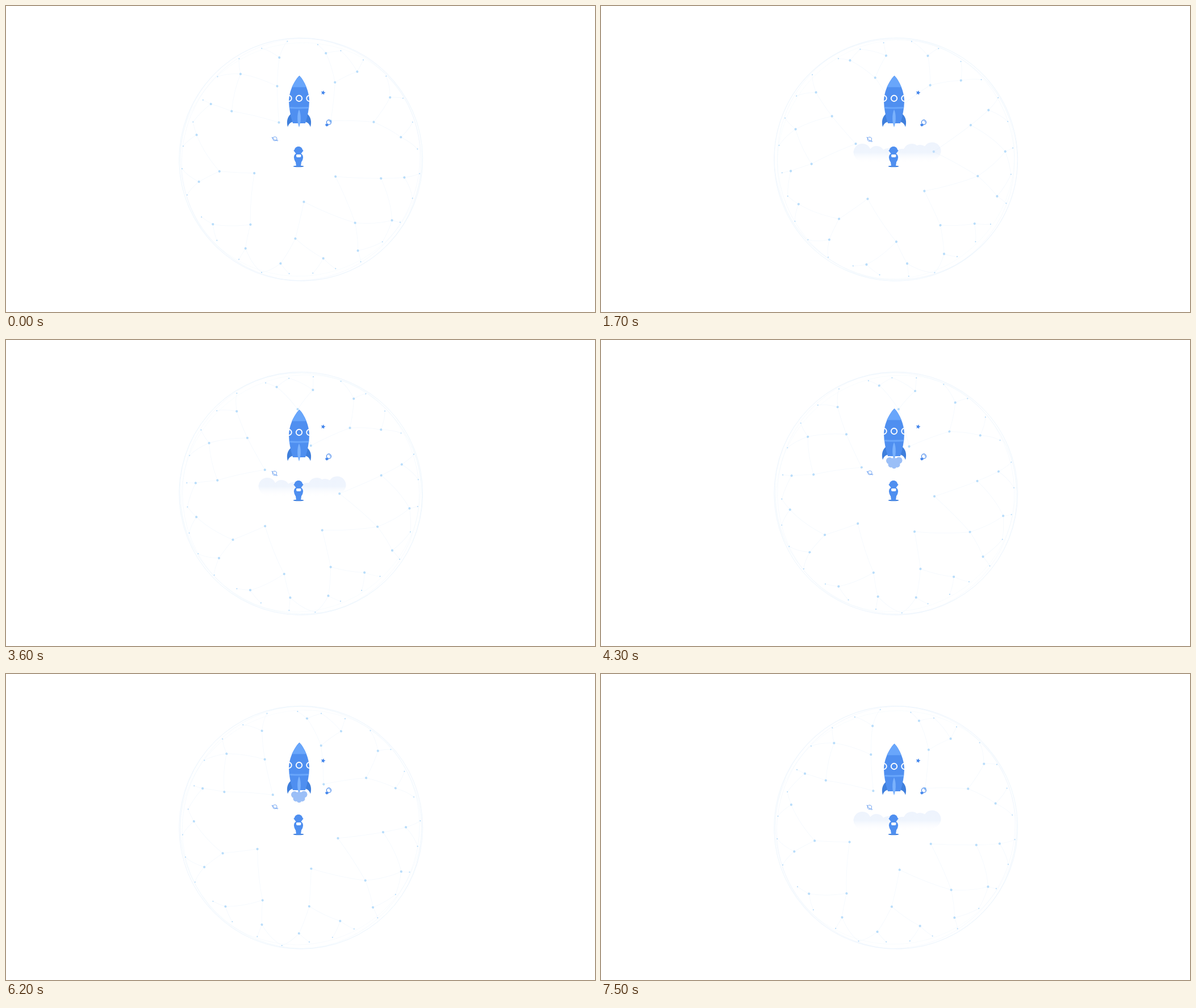
Write an HTML page that moves like this. It is 1037 px wide and 540 px high and loops after 8000 ms.

```html
<!DOCTYPE html>
<html lang="en">
<head>
<meta charset="utf-8">
<title>Rocket launch</title>
<style>
  html, body { margin: 0; width: 100%; height: 100%; overflow: hidden; background: #fff; }
  svg { display: block; width: 1037px; height: 540px; }
  .lines { fill: none; stroke: #f6fafe; stroke-width: 1; }
  .rim { fill: none; stroke: #eef6fd; stroke-width: .9; }
  .dots { fill: #b9ddfa; }
  .body { fill: #4f8ff0; }
  .light { fill: #69a6fb; }
  .dark { fill: #3f7fdc; }
  .ring { fill: none; stroke: #fff; stroke-width: 1.9; }
  .icon { fill: none; stroke: #4587ec; }
</style>
</head>
<body>
<svg viewBox="0 0 1037 540">
  <defs>
    <linearGradient id="beam" gradientUnits="userSpaceOnUse" x1="0" y1="206" x2="0" y2="260">
      <stop offset="0" stop-color="#a8c6f8"/>
      <stop offset=".5" stop-color="#c4d9fa"/>
      <stop offset="1" stop-color="#e6effd" stop-opacity="0"/>
    </linearGradient>
    <linearGradient id="mist" gradientUnits="userSpaceOnUse" x1="0" y1="240" x2="0" y2="277">
      <stop offset="0" stop-color="#c6d9f8"/>
      <stop offset=".5" stop-color="#cbddf9"/>
      <stop offset="1" stop-color="#fff" stop-opacity="0"/>
    </linearGradient>
    <clipPath id="hull">
      <path d="M516.5 123C522 128 533.5 146 534 168Q533.5 187 527 207H505Q498.500 187 498 168C498.500 146 511 128 516.500 123Z"/>
    </clipPath>
    <clipPath id="puffs">
      <circle cx="460" cy="258.500" r="15.500"/>
      <circle cx="485" cy="261" r="14"/>
      <circle cx="505" cy="264" r="13"/>
      <circle cx="530" cy="265" r="13"/>
      <circle cx="547" cy="258" r="15"/>
      <circle cx="562" cy="259" r="14"/>
      <circle cx="583" cy="256" r="15.500"/>
      <rect x="456" y="260" width="130" height="17"/>
    </clipPath>
  </defs>

  <g id="globe">
    <g id="rim" class="rim"></g>
    <path id="net" class="lines"/>
    <g id="dots" class="dots"></g>
  </g>

  <g id="flame" fill="url(#beam)">
    <path d="M513 206H519L530 260H502Z" opacity=".2"/>
    <path d="M510 206H513.500L506 260H488Z"/>
    <path d="M518.500 206H522L544 260H526Z"/>
  </g>

  <g id="rocket">
    <path class="dark" d="M502 190C495 196 493.500 204 496 213.500C498 208 501 205 506 204Z"/>
    <path class="dark" d="M530 190C537 196 538.500 204 536 213.500C534 208 531 205 526 204Z"/>
    <g clip-path="url(#hull)">
      <path class="body" d="M490 120H542V210H490Z"/>
      <path class="light" d="M490 120H542V143.300H490Z"/>
      <path class="light" d="M490 177.500Q516 179.500 542 177.500V180.500Q516 182.500 490 180.500Z"/>
      <g class="ring">
        <circle cx="497.600" cy="163" r="5.200"/>
        <circle cx="516" cy="163" r="5.200"/>
        <circle cx="534.400" cy="163" r="5.200"/>
      </g>
    </g>
    <path fill="#7bb2fc" d="M516 182.500Q519 189 518.800 199Q518.500 208 516 214Q513.500 208 513.200 199Q513 189 516 182.500Z"/>
    <g id="puff" fill="#9bbff7">
      <circle cx="508" cy="215" r="6"/>
      <circle cx="524.500" cy="214.500" r="6"/>
      <circle cx="516" cy="218" r="8"/>
      <circle cx="510.500" cy="222" r="5"/>
      <circle cx="521.500" cy="222" r="5"/>
      <circle cx="516" cy="225" r="4"/>
    </g>
  </g>

  <rect id="cloud" x="444" y="238" width="156" height="40" fill="url(#mist)" clip-path="url(#puffs)"/>

  <g>
    <ellipse class="dark" cx="515" cy="283" rx="9.500" ry="1.300"/>
    <path class="body" d="M515 248C519 248 521.500 250.500 522 253.500L523.600 255.300L519.500 260.500Q523.500 263 523 268Q522.500 273 520 275.500L519 283H511L510 275.500Q507.500 273 507 268Q506.500 263 510.500 260.500L506.400 255.300L508 253.500C508.500 250.500 511 248 515 248Z
      M512.500 262Q511 262 511 263.500V265Q511 267 513 267H517.500Q519.500 267 519.500 265V263.500Q519.500 262 518 262Z" fill-rule="evenodd"/>
  </g>

  <path id="star" fill="#4587ec"/>
  <g class="icon">
    <circle cx="568.400" cy="205.200" r="4" stroke-width="1.200"/>
    <path d="M566 207.500L562.300 208.500Q562 212 565 212.400L568 210.500Z" fill="#4587ec" stroke="none"/>
    <path d="M569 203Q570.800 203.500 570.800 205.500" stroke-width=".8"/>
  </g>
  <g id="planet" class="icon" stroke-width=".9" opacity=".8">
    <circle r="3.600"/>
    <path d="M-3.400 -1.800Q-6.200 -3.400 -5 -1.600Q-1 2.600 4.500 3.700Q6.600 3.600 3.400 1.400"/>
  </g>
</svg>

<script>
const CX = 519.2, CY = 270.8, R = 215, LOOP = 8000, STEP = 158;
const $ = id => document.getElementById(id);

let seed = 7;
function jitter(amount) {
  seed = seed * 16807 % 2147483647;
  return (seed / 2147483647 * 2 - 1) * amount;
}

function polar(r, deg) {
  const a = deg * Math.PI / 180;
  return [CX + r * Math.cos(a), CY + r * Math.sin(a)];
}

// Evenly spaced nodes on a ring, slightly scattered
function ring(count, radius, start, scatter, size) {
  return Array.from({ length: count }, (_, i) => {
    const turn = 360 / count;
    const point = polar(radius + jitter(scatter), start + i * turn + jitter(turn * 0.12));
    return Object.assign(point, { size });
  });
}

const rings = [
  ring(5, 80, 3, 12, 2.1),
  ring(9, 142, -4, 8, 2.1),
  ring(16, 186, -95, 8, 2.1),
  ring(28, 206, -86, 5, 1.1)
];

// Great-circle arc seen from the front, drawn as a quadratic curve
function arc(a, b) {
  const lift = ([x, y]) => {
    const u = x - CX, v = y - CY;
    return [u, v, Math.sqrt(Math.max(0, R * R - u * u - v * v))];
  };
  const p = lift(a), q = lift(b);
  const sum = p.map((c, i) => c + q[i]);
  const k = 2 * R / Math.hypot(...sum) - 0.5;
  return `M${a}Q${CX + sum[0] * k} ${CY + sum[1] * k} ${b}`;
}

// Each node reaches out to its two nearest nodes in the next ring
const dist = (a, b) => Math.hypot(a[0] - b[0], a[1] - b[1]);
const links = rings.slice(0, -1).flatMap((nodes, i) => nodes.flatMap(node =>
  [...rings[i + 1]].sort((a, b) => dist(node, a) - dist(node, b))
    .slice(0, 2).map(next => arc(node, next))));
$('net').setAttribute('d', links.join(''));

$('dots').innerHTML = rings.flat().map(n =>
  `<circle cx="${n[0]}" cy="${n[1]}" r="${n.size}"/>`).join('');

$('rim').innerHTML = [0, 1, 2, 3].map(i =>
  `<ellipse cx="${CX}" cy="${CY}" rx="214.5" ry="${214.5 - i * 3}"
    opacity="${1 - i * 0.2}" transform="rotate(${i * 50} ${CX} ${CY})"/>`).join('');

$('star').setAttribute('d', 'M' + Array.from({ length: 10 }, (_, i) => {
  const a = i * Math.PI / 5 - 1.35, r = i % 2 ? 2 : 4.2;
  return [558.4 + r * Math.cos(a), 153 + r * Math.sin(a)];
}).join('L') + 'Z');

const show = (id, opacity) => $(id).setAttribute('opacity', +opacity);
const place = (id, value) => $(id).setAttribute('transform', value);

function draw() {
  const t = performance.now() % LOOP;
  // The loop opens on the last tick of the cycle, then starts over
  const tick = t < 100 ? 49 : Math.min(48, Math.floor((t + 116) / STEP));
  place('globe', `rotate(${tick - 33} ${CX} ${CY})`);

  // Six poses of two ticks: idle, puff, flame, flame, flame with cloud, cloud
  const pose = Math.floor((tick + 11) % 12 / 2);
  show('puff', pose === 1);
  show('flame', pose >= 2 && pose <= 4);
  show('cloud', pose === 4 ? 1 : pose === 5 ? 0.3 : 0);
  place('rocket', `translate(0 ${pose === 1 ? -2 : 0})`);
  place('planet', pose === 5 ? 'translate(472.9 235) rotate(12)' : 'translate(473.4 234.3)');
  requestAnimationFrame(draw);
}
draw();
</script>
</body>
</html>
```
